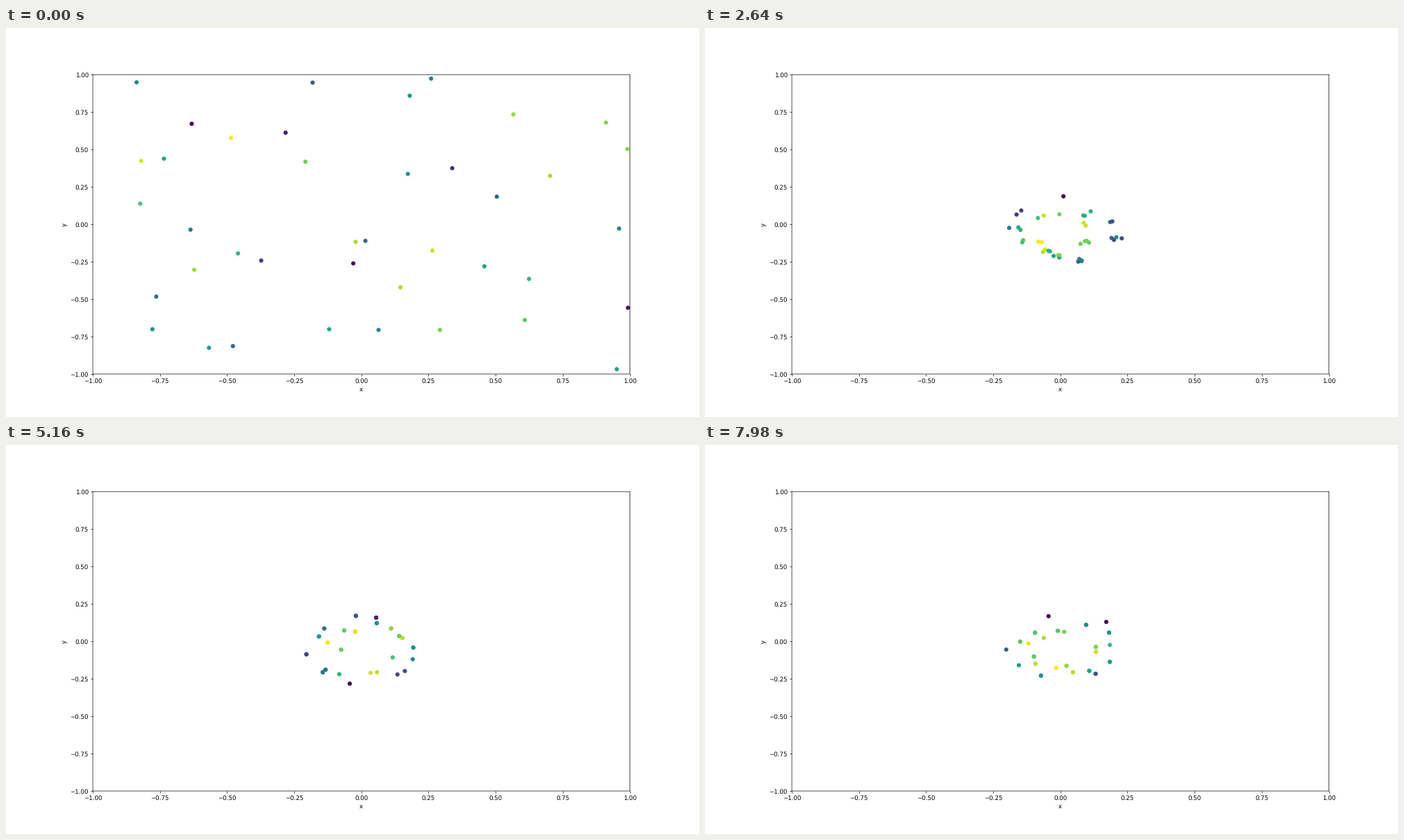
A matplotlib script for the animation above (8 s loop, 998 by 561 pixels).

```python
import numpy as np
import matplotlib.pyplot as plt
from matplotlib.animation import FuncAnimation

W, H, DPI = 998, 561, 62.375
TICK, HOLD = 20, 3          # ms per frame, frames per swarm step
COUNT, CLUMPS = 40, 24
GATHER, MERGE = 10, 16      # steps to fall inwards, decay of the scatter
CENTRE = 0.005 - 0.055j
REACH = 0.25

rng = np.random.default_rng(8)


def scatter_start():
    """Jittered 8 x 5 grid over the whole plot."""
    i = np.arange(COUNT)
    x = (i % 8 + rng.uniform(0, 1, COUNT)) / 4 - 1
    y = (i // 8 + rng.uniform(0, 1, COUNT)) / 2.5 - 1
    return x + 1j * y


# Half of the clumps circle each way, evenly spread around the ring.
index = np.arange(CLUMPS)
spin = np.where(index % 2, 1, -1)
angle = 2 * np.pi * (index // 2 + rng.uniform(0, .8, CLUMPS)) / (CLUMPS / 2)
outer = rng.uniform(.19, REACH, CLUMPS)
inner = rng.uniform(.04, .17, CLUMPS)
breath = rng.uniform(0, 2 * np.pi, CLUMPS)


def orbit(k):
    mix = .5 + .5 * np.sin(.35 * k + breath)
    radius = inner + (outer - inner) * np.sqrt(mix)
    return radius * np.exp(1j * (angle + spin * .22 * k))


clump = np.arange(COUNT) % CLUMPS
spread = .07 * (rng.normal(size=COUNT) + 1j * rng.normal(size=COUNT))
spread *= np.minimum(1, .13 / np.abs(spread))


def settled(k):
    return orbit(k)[clump] + spread * min(1, np.exp((GATHER - k) / MERGE))


# Start points are handed out by bearing, so paths run straight inwards.
start = np.empty(COUNT, complex)
free = scatter_start()
start[np.argsort(np.angle(settled(0)))] = free[np.argsort(np.angle(free))]
start_shade = rng.uniform(0, 1, COUNT) ** .8
tint = rng.uniform(-.15, .15, CLUMPS)


def state(k):
    """Positions and colour values; points near the middle are brighter."""
    u = min(k / GATHER, 1)
    rest = settled(k)
    z = CENTRE + rest + (start - CENTRE - settled(0)) * (1 - u) ** 2
    shade = 1 - .8 * (np.abs(rest) / REACH) ** 4 + tint[clump]
    shade = start_shade + (shade - start_shade) * u
    return z, (shade - shade.min()) / np.ptp(shade)


plt.rcParams["text.hinting"] = "no_hinting"
fig, ax = plt.subplots(figsize=(W / DPI, (H + 1e-6) / DPI), dpi=DPI)
fig.subplots_adjust(left=125.06 / W, right=898.5 / W,
                    bottom=1 - 499 / H, top=1 - 67.2 / H)
ax.set(xlim=(-1, 1), ylim=(-1, 1), xlabel="x", ylabel="y")
for spine in ax.spines.values():
    spine.set_snap(False)
dots = ax.scatter(start.real, start.imag, c=start_shade, cmap="viridis",
                  vmin=0, vmax=1)


def update(frame):
    z, shade = state(frame // HOLD)
    dots.set_offsets(np.column_stack([z.real, z.imag]))
    dots.set_array(shade)
    return dots,


anim = FuncAnimation(fig, update, frames=400, interval=TICK, repeat=True,
                     repeat_delay=0, init_func=lambda: update(0))
plt.show()
```
